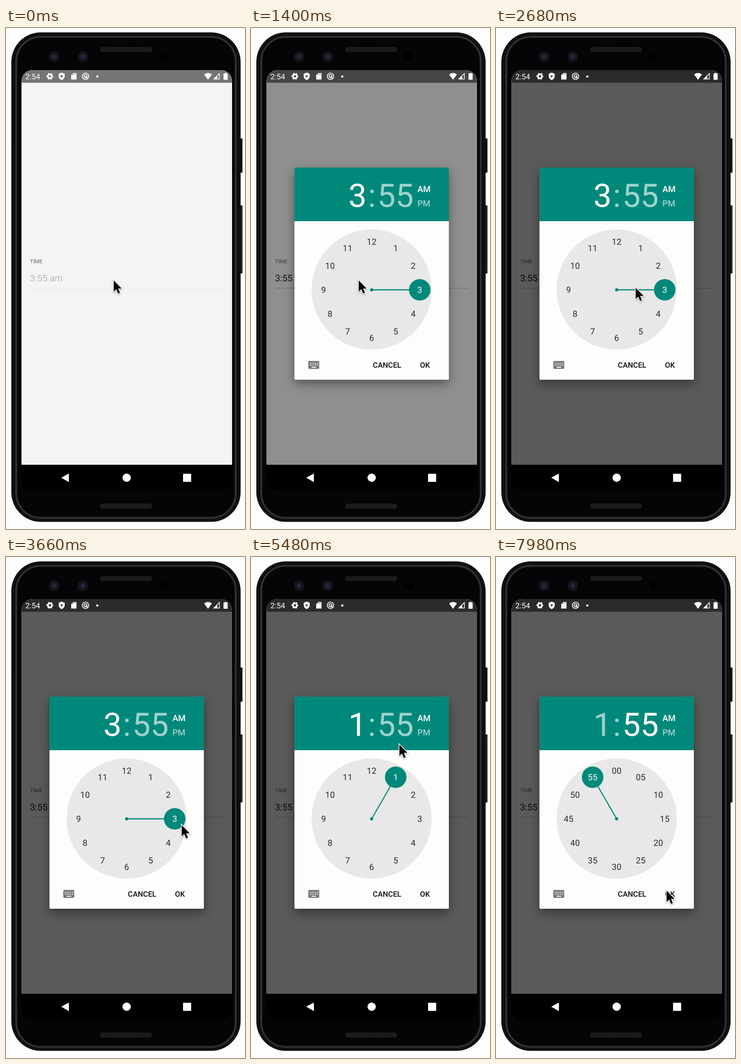
An HTML page for the animation above (8 s loop, 517 px wide and 1084 px high).

```html
<!DOCTYPE html>
<html lang="en">
<head>
<meta charset="utf-8">
<title>Time picker</title>
<style>
html, body { margin: 0; width: 100%; height: 100%; overflow: hidden; background: #fdfdfd; }
svg { display: block; font-family: Roboto, sans-serif; text-rendering: geometricPrecision; }
.mid { text-anchor: middle; }
.bold { font-weight: 500; }
#card { filter: drop-shadow(0 9px 11px rgba(0,0,0,.4)); }
#cursor { filter: drop-shadow(0 1.5px 1.5px rgba(0,0,0,.4)); }
</style>
</head>
<body>
<svg width="517" height="1084" viewBox="0 0 517 1084">
  <defs>
    <clipPath id="screen"><path d="M33.5 945V115a24 24 0 0 1 24-24H465a24 24 0 0 1 24 24V945z"/></clipPath>
    <clipPath id="knobClip"><circle id="knobHole" r="23.3"/></clipPath>
    <pattern id="mesh" width="4" height="4" patternUnits="userSpaceOnUse">
      <rect width="4" height="4" fill="#0c0c0c"/><path d="M0 0h2v2H0zM2 2h2v2H2z" fill="#2a2a2a"/>
    </pattern>
  </defs>

  <!-- phone body -->
  <rect x="505" y="239" width="6.5" height="74" rx="1" fill="#111"/>
  <rect x="505" y="384" width="6.5" height="147" rx="1" fill="#111"/>
  <path d="M509 386V529" stroke="#444"/>
  <rect x="11.5" y="9.5" width="496" height="1059" rx="64" fill="#0a0a0a"/>
  <g fill="none">
    <rect x="15" y="13" width="489" height="1052" rx="60" stroke="#161616" stroke-width="2"/>
    <rect x="22" y="19" width="475" height="1041" rx="53" stroke="#222" stroke-width="5"/>
    <rect x="22" y="19" width="475" height="1041" rx="53" stroke="#3c3c3c" stroke-width="1.6"/>
  </g>
  <rect x="25" y="22" width="469" height="1035" rx="50" fill="#050507"/>
  <g fill="#15161c">
    <circle cx="104" cy="62" r="11.5"/><circle cx="166" cy="62" r="11.5"/>
  </g>
  <g fill="#22283e">
    <circle cx="104" cy="62" r="5"/><circle cx="166" cy="62" r="5"/>
  </g>
  <circle cx="340" cy="62" r="9"/>
  <rect x="204" y="41" width="112" height="11" rx="5" fill="url(#mesh)"/>
  <rect x="204" y="1029" width="112" height="11" rx="5" fill="url(#mesh)"/>
  <path d="M33 945H489V977a24 24 0 0 1-24 24H57a24 24 0 0 1-24-24z"/>
  <g fill="#fff">
    <path d="M119.5 973L136 964V982.5z"/><circle cx="261" cy="973" r="9"/>
    <rect x="383" y="964.5" width="17.5" height="17.5" rx="1"/>
  </g>

  <!-- app screen -->
  <g clip-path="url(#screen)">
    <rect x="33" y="91" width="456" height="854" fill="#f4f4f4"/>
    <rect x="33" y="91" width="456" height="27.5" fill="#757575"/>
    <text x="52" y="508.5" font-size="11.6" fill="#666">TIME</text>
    <g id="field">
      <text x="52" y="548" font-size="19.6" fill="#1c1c1c">3:55 am</text>
      <path d="M52 563H470" stroke="#b4b4b4"/>
    </g>
    <rect id="dim" x="33" y="91" width="456" height="854"/>
  </g>

  <!-- status icons -->
  <g fill="#fff">
    <text x="42" y="111" font-size="16.5">2:54</text>
    <g fill="none" stroke="#fff">
      <circle cx="95" cy="104.5" r="4.2" stroke-width="3.4"/>
      <circle cx="95" cy="104.5" r="6.2" stroke-width="2.4" stroke-dasharray="3.6 2.9" stroke-dashoffset="1.8"/>
      <circle cx="172" cy="104.5" r="7" stroke-width="1.7"/>
      <circle cx="172" cy="104.5" r="3.3" stroke-width="1.8"/>
      <path d="M172 104.5l5 5" stroke-width="1.8"/>
    </g>
    <path d="M120.5 96.5l6.5 2.6v5q0 6-6.5 8.7q-6.5-2.7-6.5-8.7v-5z"/>
    <path d="M118.5 101v7l5.5-3.5z" fill="#555"/>
    <path d="M145.5 97.5H152.5V111.5H141V102z"/>
    <path d="M144.5 102v-3M147.5 101.5v-2.5M150 101.5v-2.5" stroke="#666"/>
    <circle cx="197.5" cy="105" r="2.4"/>
    <path d="M437 112L428.5 100.5q8.5-6.5 17 0z"/>
    <path d="M449.5 110.5H461.5V98.5z" fill="none" stroke="#fff" stroke-width="1.5"/>
    <path d="M449 111L457 103V111z"/>
    <path d="M473 97h4v1.5h2.5V112h-9V98.5H473z"/>
  </g>

  <!-- dialog -->
  <g id="dialog">
    <rect id="card" x="94" y="302" width="334" height="459" rx="2" fill="#fdfdfc"/>
    <path d="M94 418V304a2 2 0 0 1 2-2H426a2 2 0 0 1 2 2V418z" fill="#00897b"/>
    <g fill="#fff" font-size="70" class="mid">
      <text id="hourText" x="230.3" y="386.5"></text>
      <text x="261.5" y="386.5" fill-opacity=".62">:</text>
      <text id="minText" x="312.5" y="386.5">55</text>
    </g>
    <g fill="#fff" font-size="18.5" class="bold">
      <text x="360" y="354.5">AM</text>
      <text x="360" y="385.5" fill-opacity=".62">PM</text>
    </g>
    <circle cx="261" cy="566" r="130" fill="#e8e8e8"/>
    <g class="mid" font-size="18.5">
      <g id="hours" fill="#2b2b2b"></g>
      <g id="minutes" fill="#2b2b2b"></g>
      <g fill="#00897b">
        <circle cx="261" cy="566.5" r="3.5"/>
        <path id="hand" stroke="#00897b" stroke-width="2.3"/>
        <circle id="knob" r="23.3"/>
      </g>
      <g clip-path="url(#knobClip)" fill="#fff">
        <text id="hourPick"></text><text id="minPick">55</text>
      </g>
    </g>
    <rect x="124" y="720.5" width="23.5" height="17" rx="2" fill="#757575"/>
    <path d="M127 725.5H145M127 729.5H145" stroke="#fdfdfd" stroke-width="2" stroke-dasharray="2.2 1.75"/>
    <path d="M131 734H141" stroke="#fdfdfd" stroke-width="2"/>
    <g class="bold" font-size="16.3" fill="#0c0c0c">
      <text x="263.5" y="735">CANCEL</text><text x="365.5" y="735">OK</text>
    </g>
  </g>

  <path id="cursor" d="M0 0V24.5L5.6 19.2L9.6 28.7L13.6 27L9.6 17.7H17.3z" stroke="#fff" stroke-width="3" paint-order="stroke"/>
</svg>
<script>
const LOOP = 8000, CX = 261, CY = 566.5, R = 104;
const GRAB = 3900, REST = 5300, SWITCH = 6220;
// time, x, y of the pointer tip
const track = [
  [0, 233, 546], [2200, 233, 546], [3200, 380, 580], [GRAB, 380, 580],
  [REST, 321, 406], [6180, 321, 406], [6460, 362, 706], [6800, 369, 722], [LOOP, 369, 722]
];
const $ = id => document.getElementById(id);
const set = (id, attrs) => { for (const k in attrs) $(id).setAttribute(k, attrs[k]); };
const ramp = (t, a, b) => Math.min(1, Math.max(0, (t - a) / (b - a)));
const ease = p => (1 - Math.cos(Math.PI * p)) / 2;
const mix = (a, b, p) => a + (b - a) * p;

function polar(deg) {
  const a = deg * Math.PI / 180;
  return [CX + R * Math.sin(a), CY - R * Math.cos(a)];
}

function labelPos(i) {
  const [x, y] = polar(i * 30);
  return { x, y: y + 6.5 };
}

function pointer(t) {
  const i = track.findIndex(k => k[0] > t);
  const a = track[i - 1], b = track[i], p = ease(ramp(t, a[0], b[0]));
  return [mix(a[1], b[1], p), mix(a[2], b[2], p)];
}

function dial(id, label) {
  for (let i = 0; i < 12; i++) {
    const { x, y } = labelPos(i);
    $(id).innerHTML += `<text x="${x}" y="${y}">${label(i)}</text>`;
  }
}
dial('hours', i => i || 12);
dial('minutes', i => String(i * 5).padStart(2, '0'));
set('minPick', labelPos(11));

function draw(t) {
  set('field', { opacity: mix(0.27, 1, ease(ramp(t, 500, 750))) });
  set('dim', { 'fill-opacity': 0.63 * ramp(t, 1210, 1500) });
  set('dialog', { opacity: ramp(t, 1185, 1350) });

  // the dragged hand snaps to the nearest hour
  const [dx, dy] = pointer(Math.min(REST, Math.max(GRAB, t)));
  const hour = Math.round(Math.atan2(dx - CX, CY - dy) * 6 / Math.PI);
  const turn = ease(ramp(t, SWITCH, SWITCH + 450));
  const [x, y] = polar(mix(hour * 30, -30, turn));

  $('hourText').textContent = $('hourPick').textContent = hour;
  set('hourText', { 'fill-opacity': t < SWITCH ? 1 : 0.62 });
  set('minText', { 'fill-opacity': t < SWITCH ? 0.62 : 1 });
  set('hours', { 'fill-opacity': 1 - turn });
  set('minutes', { 'fill-opacity': turn });
  set('hourPick', { ...labelPos(hour), 'fill-opacity': 1 - turn });
  set('minPick', { 'fill-opacity': turn });
  set('hand', { d: `M${CX} ${CY}L${x} ${y}` });
  set('knob', { cx: x, cy: y });
  set('knobHole', { cx: x, cy: y });
  set('cursor', { transform: `translate(${pointer(t)})` });
}

function tick() {
  draw(performance.now() % LOOP);
  requestAnimationFrame(tick);
}
tick();
</script>
</body>
</html>
```
